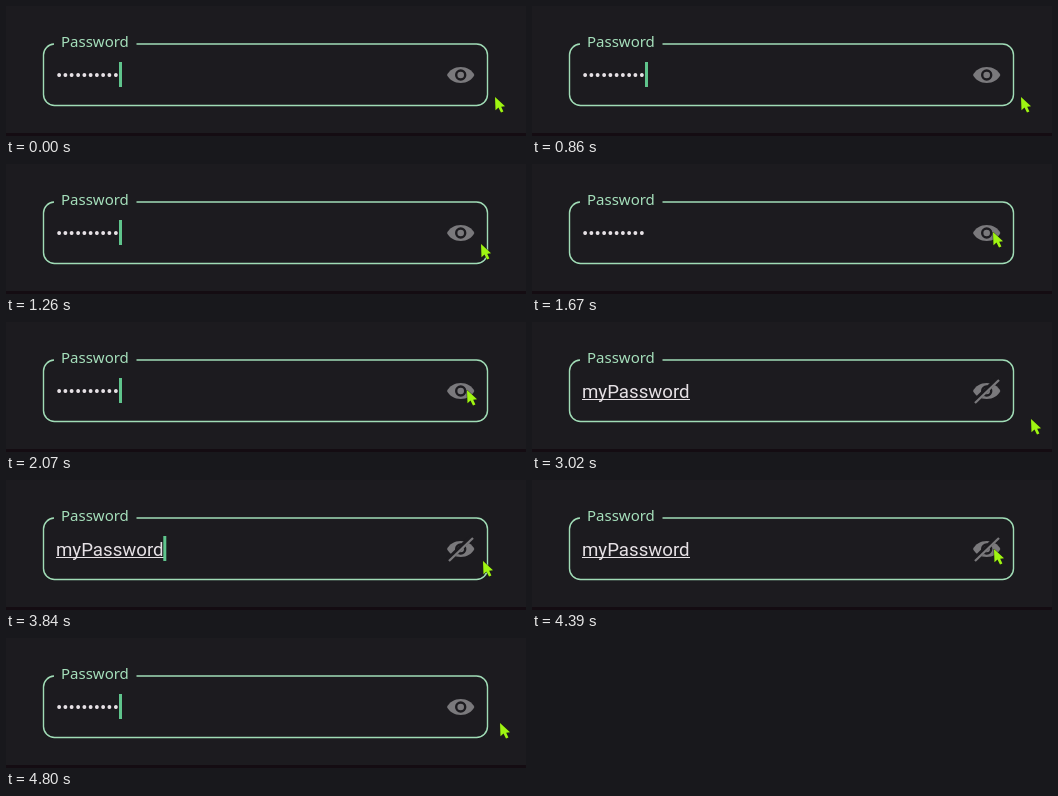
These frames come from a looping animation (520x130 px, 5060 ms). An HTML page:

```html
<!DOCTYPE html>
<html lang="en">
<head>
<meta charset="utf-8">
<title>Password field</title>
<style>
  html, body { margin: 0; width: 100%; height: 100%; overflow: hidden; background: #1c1b1f; }
  svg { display: block; }
  .label { font: 15px "Noto Sans", "Open Sans", sans-serif; fill: #a5dfbb; }
  .value { font: 18.667px Roboto, sans-serif; fill: #e6e1e5; }
</style>
</head>
<body>
<svg width="520" height="130" viewBox="0 0 520 130">
  <rect y="127" width="520" height="3" fill="#140c12"/>
  <path d="M130.5 38H470.5a11 11 0 0 1 11 11V88.5a11 11 0 0 1-11 11H48.5a11 11 0 0 1-11-11V49a11 11 0 0 1 10.5-11"
        fill="none" stroke="#a0dcb6" stroke-width="1.4"/>
  <text class="label" x="55" y="41">Password</text>

  <text class="value" id="hidden" x="50" y="76">••••••••••</text>
  <g id="shown">
    <text class="value" x="50" y="76">myPassword</text>
    <rect x="50" y="77" width="108" height="1" fill="#e6e1e5"/>
  </g>
  <rect id="caret" y="56" width="3" height="25" fill="#5fc48c"/>

  <path d="M441 69C443.4 64.2 448.5 61 454.7 61S466 64.2 468.4 69C466 73.8 460.9 77 454.7 77S443.4 73.8 441 69Z" fill="#7a797c"/>
  <circle cx="454.7" cy="69" r="4.5" fill="none" stroke="#1c1b1f" stroke-width="2.4"/>
  <g id="slash">
    <path d="M441.5 80.5L466 56.5" stroke="#1c1b1f" stroke-width="5"/>
    <path d="M443 81L467 58" stroke="#7a797c" stroke-width="2.3"/>
  </g>

  <path id="pointer" d="M0 0L.5 13.2L3.5 10.6L6 15.6L8.4 14.5L6.2 9.8L10 9.3Z"
        fill="#9ff512" stroke="#1f2414" stroke-width="1" paint-order="stroke"/>
</svg>
<script>
  const LOOP = 5060, REVEAL = 2210, CONCEAL = 4460;
  const [hidden, shown, caret, slash, pointer] =
    ["hidden", "shown", "caret", "slash", "pointer"].map(id => document.getElementById(id));

  const caretToggles = [330, 860, 1400, 1870, 3020, 3570, 4050, CONCEAL];
  const START = [489, 91];
  const moves = [
    { first: 1120, last: 1670, steps: 9, to: [461, 68] },
    { first: 2350, last: 2490, steps: 3, to: [499, 97] },
    { first: 3770, last: 4050, steps: 5, to: [461.5, 69] },
    { first: 4530, last: 4800, steps: 5, to: [493.5, 85] }
  ];

  const show = (el, on) => el.setAttribute("visibility", on ? "visible" : "hidden");

  // The pointer advances in discrete, decelerating steps.
  function pointerAt(t) {
    let pos = START;
    for (const { first, last, steps, to } of moves) {
      if (t < first) break;
      const interval = (last - first) / (steps - 1);
      const step = Math.floor((t - first + 1) / interval) + 1;
      const eased = 1 - (1 - Math.min(step / steps, 1)) ** 1.7;
      pos = pos.map((from, i) => from + (to[i] - from) * eased);
    }
    return pos;
  }

  function render(now) {
    const t = now % LOOP;
    const revealed = t >= REVEAL && t < CONCEAL;
    show(hidden, !revealed);
    show(shown, revealed);
    show(slash, revealed);
    show(caret, caretToggles.filter(at => t >= at).length % 2 === 0);
    caret.setAttribute("x", revealed ? 157.3 : 113);
    const [x, y] = pointerAt(t).map(Math.round);
    pointer.setAttribute("transform", `translate(${x} ${y})`);
  }

  const origin = performance.now();
  function frame() {
    render(performance.now() - origin);
    requestAnimationFrame(frame);
  }
  frame();
</script>
</body>
</html>
```
